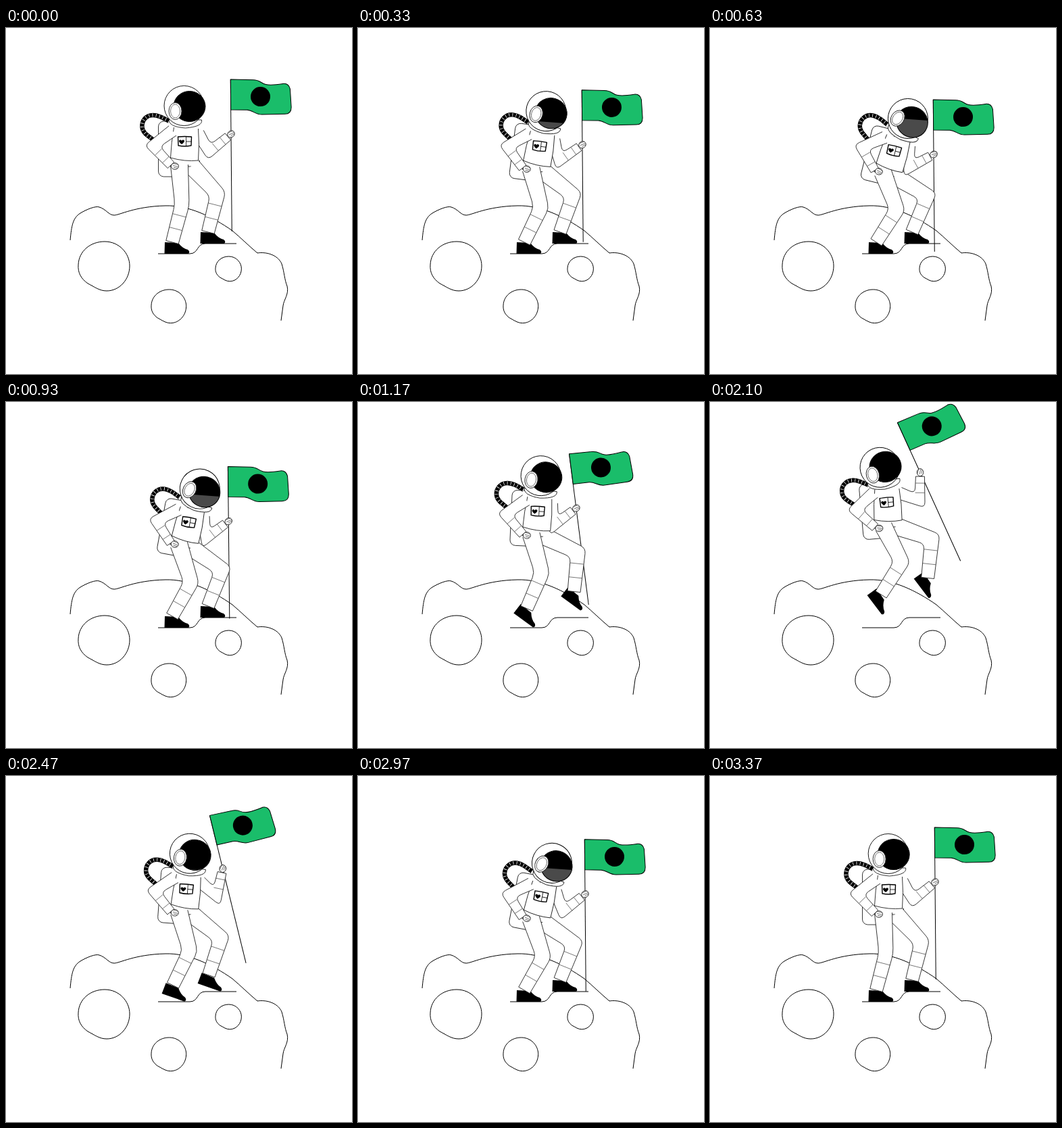
An HTML page that plays this animation: 512x512 px, repeating every 4.03 s.

```html
<!DOCTYPE html>
<html lang="en">
<head>
<meta charset="utf-8">
<title>Moon hop</title>
<style>
html, body { margin: 0; width: 100%; height: 100%; overflow: hidden; background: #fff; }
svg { display: block; width: 100vw; height: 100vh; }
path, circle, ellipse, line, rect { stroke-linejoin: round; }
.ink { fill: none; stroke: #000; stroke-width: 1; }
.suit { fill: #fff; stroke: #222; stroke-width: .9; }
.thin { fill: none; stroke: #555; stroke-width: .8; }
</style>
</head>
<body>
<svg viewBox="0 0 512 512">
  <defs>
    <clipPath id="visor"><ellipse cx="8" cy="1" rx="23.5" ry="22.5"/></clipPath>
    <!-- origin at the tip of the sole -->
    <path id="boot" d="M-36 -17L-36.5 0H-1Q2 -3 -2 -6Q-10 -8 -16 -16Z"/>
    <path id="tube" d="M23 -8C12 -14 6 -17 -1 -17C-12 -17 -18 -8 -17 1C-16 10 -7 14 0 20"/>
    <path id="crater" vector-effect="non-scaling-stroke" d="M0 34C1 14 18 0 39 0C61 0 76 18 76 36C76 56 61 73 42 73C31 73 24 67 14 62C4 55 -1 46 0 34Z"/>
    <g id="fist">
      <ellipse class="suit" rx="5.5" ry="4.8"/>
      <path class="thin" d="M-2 -4Q3 -3 5 -2M-3 -1Q2 0 5 1M-2 2Q2 2 4 3"/>
    </g>
  </defs>

  <g class="ink">
    <path d="M95 314C97 292 99 281 110 274C120 268 133 263 138 265C148 268 152 277 160 277C168 277 190 264 236 263C270 262 305 279 335 300C348 311 360 323 372 333C384 331 402 335 408 349C412 362 412 372 416 382C419 394 411 402 410 411L407 433"/>
    <path d="M225 334H272C285 334 282 319 295 319H341"/>
    <use href="#crater" x="107" y="316"/>
    <use href="#crater" transform="translate(215 387) scale(.68)"/>
    <use href="#crater" transform="translate(310 338) scale(.505)"/>
  </g>

  <g id="pack">
    <rect class="suit" x="-39" y="-56" width="34" height="82" rx="8"/>
    <path class="suit" d="M-21 -3V11H22V2"/>
  </g>
  <g id="hose" fill="none">
    <use href="#tube" stroke="#000" stroke-width="6.5"/>
    <use href="#tube" stroke="#fff" stroke-width="5" stroke-dasharray=".8 4.4"/>
  </g>

  <!-- origin at the grip -->
  <g id="flag">
    <line class="ink" y1="-81" y2="144"/>
    <path transform="translate(0 -81)" d="M0 0L33 1C44 1 44 6 52 8C60 10 72 8 79 7Q86 7 88 15L89.5 42Q89.5 52 80 52L46 52.5C36 52.5 33 46 24 45.5L0 45Z" fill="#1abd6a" stroke="#000"/>
    <circle cx="44" cy="-55" r="14.5"/>
  </g>

  <use id="footR" href="#boot"/>
  <path id="legR" class="suit"/><path id="legRBands" class="thin"/>
  <use id="footL" href="#boot"/>
  <path id="legL" class="suit"/><path id="legLBands" class="thin"/>

  <path id="armR" class="suit"/><path id="armRBands" class="thin"/>
  <use id="handR" href="#fist"/>

  <!-- origin at the waist -->
  <g id="torso">
    <path class="suit" d="M-16 -47Q-20 -25 -21 -2Q0 4 20 2Q22 -22 20 -45"/>
    <g fill="none" stroke="#000" stroke-width="1.4">
      <path d="M-10 -33Q0 -34 10 -33L9.5 -20Q0 -18 -9.5 -20Z"/>
      <path d="M2 -33V-19M2 -26H10" stroke-width=".8"/>
    </g>
    <path d="M-4.5 -22Q-11 -27 -7 -28.5Q-5 -29 -4.5 -27Q-4 -29 -2 -28.5Q2 -27 -4.5 -22Z"/>
  </g>

  <path id="collar" class="suit" d="M-22 20Q-24 31 2 33Q28 31 26 21Z"/>
  <g id="head">
    <circle class="suit" r="29.5" style="stroke:#000"/>
    <g clip-path="url(#visor)">
      <ellipse cx="8" cy="1" rx="23.5" ry="22.5"/>
      <rect id="shade" x="-40" width="80" height="60" fill="#4a4a4a"/>
    </g>
    <ellipse class="ink" cx="8" cy="1" rx="23.5" ry="22.5"/>
    <ellipse class="suit" cx="-13" cy="8" rx="9.5" ry="12.5"/>
    <ellipse class="thin" cx="-13" cy="8" rx="7" ry="10"/>
  </g>

  <path id="armL" class="suit"/><path id="armLBands" class="thin"/>
  <use id="handL" href="#fist"/>
</svg>

<script>
const LOOP = 4030, RAD = Math.PI / 180;
const $ = id => document.getElementById(id);

const ease = (t, a, b) => {
  const s = Math.min(1, Math.max(0, (t - a) / (b - a)));
  return s * s * (3 - 2 * s);
};

// Eased steps from a start value through [from, to, value] moves.
const moves = (t, start, ...steps) =>
  steps.reduce((v, [a, b, end]) => v + (end - v) * ease(t, a, b), start);

const lean = t => moves(t, 0, [0, 640, 14], [690, 1700, -10.5], [1700, 2930, 11], [2950, 3370, 0]);
const tilt = t => moves(t, -.5, [900, 1670, -24.5], [2100, 2900, -.5]);
const gripX = t => moves(t, 333, [0, 640, 331], [760, 1700, 311], [2100, 2970, 336], [2970, 3370, 333]);
const gripY = t => moves(t, 157, [0, 640, 187], [640, 1950, 104], [2080, 2900, 175], [2950, 3370, 157]);
const heel = t => moves(t, 0, [960, 1170, 36], [1170, 1670, 54], [2040, 2760, 0]);
const air = t => moves(t, 0, [1170, 2040, 20], [2040, 2470, 0]);
const stride = t => moves(t, 0, [960, 1170, 1], [2040, 2470, 0]);

const fmt = p => p.map(v => v.toFixed(2)).join(" ");
const mix = (a, b, t) => a.map((v, i) => v + (b[i] - v) * t);
const along = (p, dir, n) => [p[0] + dir[0] * n, p[1] + dir[1] * n];
const turn = ([x, y], deg) => {
  const c = Math.cos(deg * RAD), s = Math.sin(deg * RAD);
  return [x * c - y * s, x * s + y * c];
};
const offset = (o, p, deg) => along(o, turn(p, deg), 1);

function unit(a, b) {
  const x = b[0] - a[0], y = b[1] - a[1], l = Math.hypot(x, y) || 1;
  return [x / l, y / l];
}

const normal = (a, b) => turn(unit(a, b), 90);

// Middle joint of two bones of lengths l1 and l2 between a and c.
function joint(a, c, l1, l2, side) {
  const d = Math.min(Math.hypot(c[0] - a[0], c[1] - a[1]), l1 + l2 - .1);
  const x = (l1 * l1 - l2 * l2 + d * d) / (2 * d);
  const y = Math.sqrt(Math.max(0, l1 * l1 - x * x));
  return along(along(a, unit(a, c), x), normal(a, c), side * y);
}

// Two-bone sleeve a-b-c with half widths w, open at a.
function limb(id, a, b, c, w, bands) {
  const n1 = normal(a, b), n2 = normal(b, c);
  const bend = 1 + n1[0] * n2[0] + n1[1] * n2[1];
  const miter = [(n1[0] + n2[0]) / bend, (n1[1] + n2[1]) / bend];
  const side = s => {
    const A = along(a, n1, s * w[0]);
    const M = along(b, miter, s * w[1]);
    const C = along(c, n2, s * w[2]);
    return [A, along(M, unit(M, A), 8), M, along(M, unit(M, C), 8), C].map(fmt);
  };
  const l = side(1), r = side(-1);
  $(id).setAttribute("d",
    `M${l[0]}L${l[1]}Q${l[2]} ${l[3]}L${l[4]}L${r[4]}L${r[3]}Q${r[2]} ${r[1]}L${r[0]}`);
  $(id + "Bands").setAttribute("d", bands.map(t => {
    const p = mix(b, c, t), h = w[1] + (w[2] - w[1]) * t;
    return `M${fmt(along(p, n2, h))}L${fmt(along(p, n2, -h))}`;
  }).join(""));
}

function place(id, pos, deg) {
  $(id).setAttribute("transform", `translate(${fmt(pos)}) rotate(${deg.toFixed(2)})`);
}

function leg(id, hip, toe, deg, l1, l2) {
  const ankle = offset(toe, [-25, -17], deg);
  place("foot" + id, toe, deg);
  limb("leg" + id, hip, joint(hip, ankle, l1, l2, -1), ankle, [13, 10.5, 9.5], [.28, .64]);
}

function arm(id, shoulder, elbow, wrist) {
  limb("arm" + id, shoulder, elbow, wrist, [9, 7.5, 6.5], [.32, .72]);
}

function draw(t) {
  const rot = lean(t), nod = 2.4 * lean(t - 30), lift = heel(t);
  const waist = [264.5 + rot * .1, 194 + rot * .93 - lift * .24 - air(t) * .1];
  const onBody = (x, y) => offset(waist, [x, y], rot);

  place("torso", waist, rot);
  place("pack", waist, rot);
  place("hose", offset(waist, [-46, -48], rot * 1.4), rot * .85);

  const head = offset(onBody(-1, -50), [0, -29], nod);
  place("head", head, nod);
  place("collar", head, (nod + rot) / 2);
  const shine = 22 - 2.6 * Math.max(0, rot - 4);
  $("shade").setAttribute("transform",
    `translate(8 1) rotate(${(4 - nod).toFixed(2)}) translate(0 ${shine.toFixed(2)})`);

  // Boots roll over their tips, the far one also steps ahead.
  const drift = -.31 * lift, step = stride(t);
  leg("L", onBody(-8, 9), [271 + drift, 334 - air(t)], lift, 59, 57);
  leg("R", onBody(10, 10), [324 + drift + 17 * step, 319 - air(t) - 10 * step], lift, 57, 58);

  const shoulderL = onBody(-18, -42), wristL = onBody(-20.5, 9);
  arm("L", shoulderL, joint(shoulderL, wristL, 37.5, 39.5, 1), wristL);
  place("handL", along(wristL, [6, 1.5], 1), rot);

  const shoulderR = onBody(20, -38), grip = [gripX(t), gripY(t)];
  const elbowR = joint(shoulderR, grip, 32, 41.5, 1), dir = unit(elbowR, grip);
  arm("R", shoulderR, elbowR, along(grip, dir, -6));
  place("handR", grip, Math.atan2(dir[1], dir[0]) / RAD);
  place("flag", grip, tilt(t));
}

function tick() {
  draw(performance.now() % LOOP);
  requestAnimationFrame(tick);
}
tick();
</script>
</body>
</html>
```
